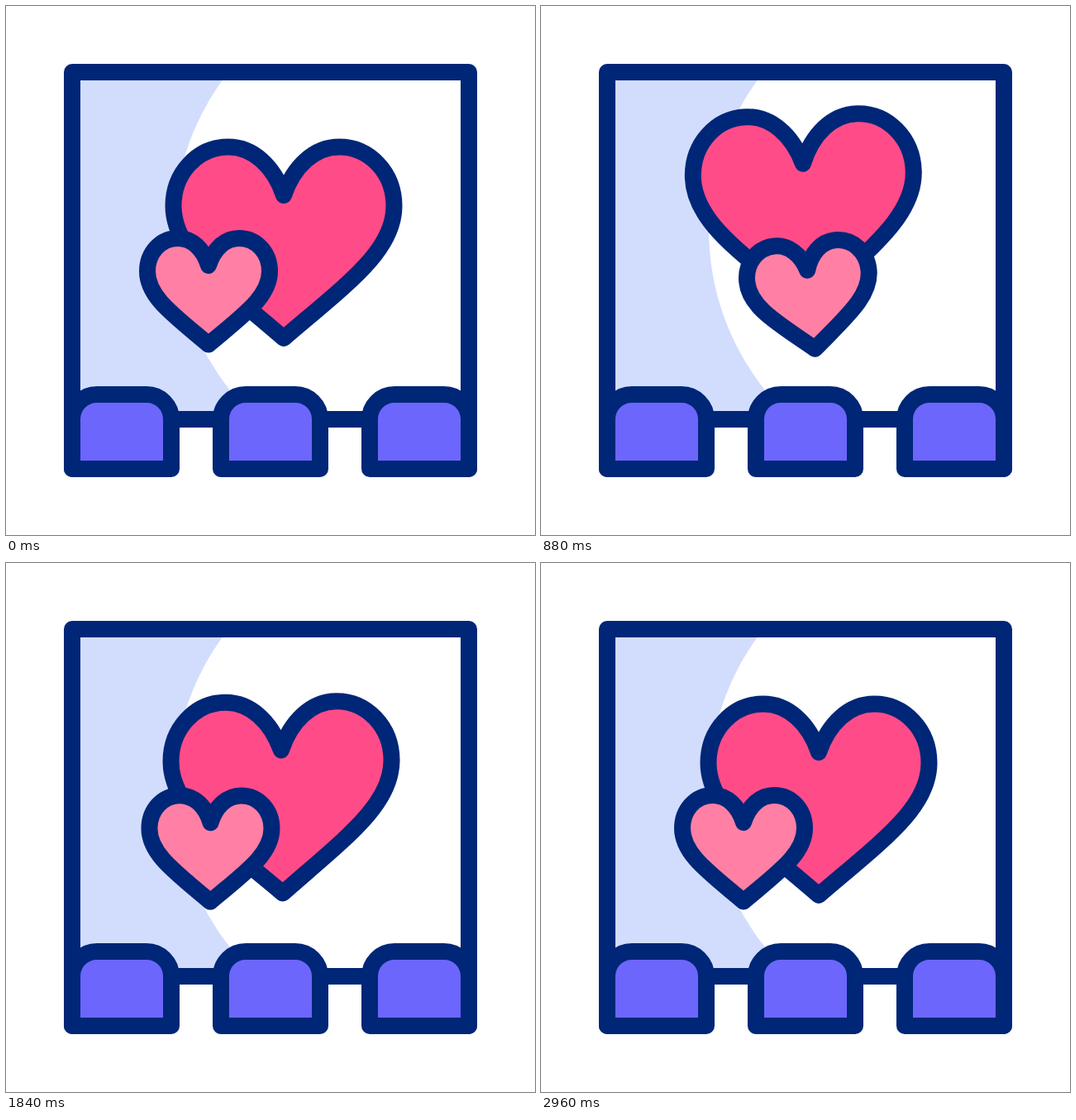
Recreate the animation shown at these times as an HTML page. Size 640 by 640 pixels, loop 3 s.

```html
<!DOCTYPE html>
<html lang="en">
<head>
<meta charset="utf-8">
<title>Hearts on screen</title>
<style>
  html, body { margin: 0; width: 100%; height: 100%; overflow: hidden; background: #fff; }
  svg { display: block; width: 100%; height: 100%; }
  .line { stroke: #002677; stroke-width: 20; stroke-linecap: round; stroke-linejoin: round; fill: none; }
  .seat { fill: #6c66fc; }
  #big { fill: #ff4c88; }
  #small { fill: #ff80a4; }
</style>
</head>
<body>
<svg viewBox="0 0 640 640">
  <path fill="#d2ddfd" d="M80 80H269A310 310 0 0 0 304 500H80Z"/>
  <path class="line" d="M80 560V80H560V560M200 500H440"/>
  <defs>
    <path id="seat" d="M0 560V500a30 30 0 0 1 30-30h60a30 30 0 0 1 30 30v60Z"/>
  </defs>
  <use class="line seat" href="#seat" x="80"/>
  <use class="line seat" href="#seat" x="260"/>
  <use class="line seat" href="#seat" x="440"/>
  <!-- each heart is drawn around its own centre -->
  <path id="big" class="line" d="M0-57C-12-92-37-115.5-67-115.5C-104-115.5-133.5-84-133.5-44C-133.5 10-78 49 0 116C78 49 133.5 10 133.5-44C133.5-84 104-115.5 67-115.5C37-115.5 12-92 0-57Z"/>
  <path id="small" class="line" d="M0-31.5C-6-51.5-20-64.5-37-64.5C-58-64.5-74-47-74-24.5C-74 6.500-42 28.500 0 64C42 28.500 74 6.500 74-24.500C74-47 58-64.500 37-64.500C20-64.500 6-51.500 0-31.500Z"/>
</svg>
<script>
const LOOP = 3000, BEAT_START = 2080, BEAT_END = 2800;

// keys: time, x offset, y offset, rotation
const hearts = [
  { el: document.getElementById('big'), cx: 336, cy: 286, depth: 0.084, keys: [
    [0, 0, 0, 0],
    [360, -48, -17, -5.1],
    [560, -82, -32, -8.4],
    [640, -80.4, -34.6, -8.65],
    [1080, 36, -36, 4.3],
    [1520, 13, -12, -0.8],
    [1680, 1, -6.5, -1],
    [BEAT_START, 0, 0, 0]
  ] },
  { el: document.getElementById('small'), cx: 245, cy: 345.5, depth: 0.12, keys: [
    [0, 0, 0, 0],
    [360, 110, -3, 5.4],
    [560, 190, -3, 9.6],
    [640, 193.6, -2.5, 10],
    [1080, -26.3, 11.5, -18.2],
    [1520, -16, 4, -2.7],
    [1680, -2, 1.5, -0.6],
    [BEAT_START, 0, 0, 0]
  ] }
];

// slope at a key, weighted towards the nearer neighbour
function slope(keys, i, c) {
  if (i === 0 || i === keys.length - 1) return 0;
  const [a, b, d] = [keys[i - 1], keys[i], keys[i + 1]];
  const before = b[0] - a[0], after = d[0] - b[0];
  return (before * (d[c] - b[c]) / after + after * (b[c] - a[c]) / before) / (before + after);
}

// cubic Hermite curve through one column of the keys
function sample(keys, t, c) {
  const i = keys.findIndex(k => k[0] > t) - 1;
  if (i < 0) return keys[keys.length - 1][c];
  const a = keys[i], b = keys[i + 1], h = b[0] - a[0];
  const u = (t - a[0]) / h, v = 1 - u;
  return v * v * (1 + 2 * u) * a[c] + u * u * (1 + 2 * v) * b[c]
    + h * u * v * (v * slope(keys, i, c) - u * slope(keys, i + 1, c));
}

function beat(t, depth) {
  const u = (t - BEAT_START) / (BEAT_END - BEAT_START);
  return u <= 0 || u >= 1 ? 1 : 1 - depth * (1 - Math.cos(2 * Math.PI * u)) / 2;
}

function draw() {
  const t = performance.now() % LOOP;
  for (const { el, cx, cy, depth, keys } of hearts) {
    const [x, y, r] = [1, 2, 3].map(c => sample(keys, t, c));
    el.setAttribute('transform',
      `translate(${cx + x} ${cy + y}) rotate(${r}) scale(${beat(t, depth)})`);
  }
  requestAnimationFrame(draw);
}
draw();
</script>
</body>
</html>
```
